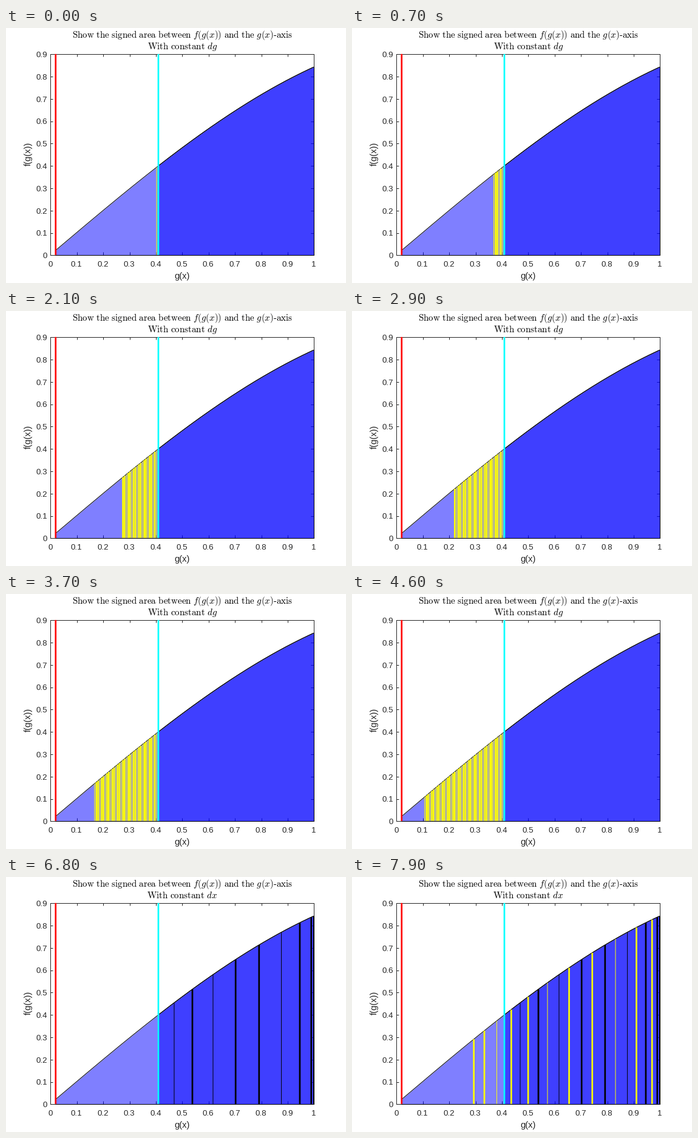
These frames come from a looping animation (560 px wide and 420 px high, 8000 ms). A matplotlib script:

```python
import numpy as np
import matplotlib.pyplot as plt
from matplotlib.animation import FuncAnimation
from matplotlib.collections import LineCollection

DPI = 80
PX = 72 / DPI                       # one pixel in points
LEFT, WIDTH, BOTTOM, HEIGHT = 72.8, 434, 373.8, 331
INK = "#262626"
THICK, THIN = 2.67 * PX, 1.0 * PX

X_START, DX = -1.2, 0.1375
G_LAST = 0.02

plt.rcParams["font.family"] = "Liberation Sans"
plt.rcParams["mathtext.fontset"] = "cm"


def g(x):
    return 1 / (1 + x ** 2)


G_FIRST = g(X_START)
DG = (G_FIRST - G_LAST) / 58


def sx(v):
    return LEFT + WIDTH * v


def sy(v):
    return BOTTOM - HEIGHT * v / 0.9


def pixel(p):
    """Centre of the pixel that holds p."""
    return np.floor(p) + 0.5


fig = plt.figure(figsize=(560 / DPI, 420 / DPI), dpi=DPI, facecolor="white")
ax = fig.add_axes([0, 0, 1, 1])
ax.set_xlim(0, 560)
ax.set_ylim(420, 0)
ax.axis("off")


def line(xs, ys, color, width=THIN, z=1, snap=None):
    ax.plot(xs, ys, color=color, lw=width, zorder=z, snap=snap,
            solid_capstyle="butt")


def label(x, y, text, size, **kw):
    kw.setdefault("ha", "center")
    kw.setdefault("va", "baseline")
    return ax.text(x, y, text, fontsize=size * PX, color=kw.pop("color", INK), **kw)


def upright(words):
    return r"\ ".join(r"\text{%s}" % w for w in words.split())


# frame, ticks and tick labels
x0, x1 = pixel(sx(0)), pixel(sx(1))
y0, y1 = pixel(sy(0.9)), pixel(sy(0))
line([x0, x1, x1, x0, x0], [y0, y0, y1, y1, y0], INK, snap=True)
TICK = 4.5
for i in range(11):
    v = i / 10
    tx = pixel(sx(v))
    line([tx, tx], [y0, y0 + TICK], INK, snap=True)
    line([tx, tx], [y1 - TICK, y1], INK, snap=True)
    label(sx(v), 393, f"{v:g}", 13.33)
    if i < 10:
        ty = pixel(sy(v))
        line([x0, x0 + TICK], [ty, ty], INK, snap=True)
        line([x1 - TICK, x1], [ty, ty], INK, snap=True)
        label(68, sy(v) + 5.3, f"{v:g}", 13.33, ha="right")
label(290, 413, "g(x)", 14.67)
label(36.5, 207.5, "f(g(x))", 14.67, rotation=90, va="center")

# title
head = (upright("Show the signed area between") + r"\ f(g(x))\ "
        + upright("and the") + r"\ g(x)" + upright("-axis"))
label(290.3, 15.5, f"${head}$", 15, color="black")
subtitle = label(290.3, 35, "", 15, color="black")

# two overlapping translucent areas, each with its own outline
for start in (G_LAST, G_FIRST):
    gs = np.linspace(start, 1, 200)
    xs, ys = sx(gs), sy(np.sin(gs))
    ax.fill_between(xs, sy(0), ys, color="blue", alpha=0.5, lw=0, zorder=2)
    line(xs, ys, "black", z=3, snap=False)
    line([sx(start), x1, x1], [y1, y1, ys[-1]], "black", z=3, snap=True)

marks = LineCollection([], zorder=4, snap=False, capstyle="butt")
ax.add_collection(marks)


def upright_line(v, top):
    x = sx(v) + 0.3
    return [(x, sy(0)), (x, sy(top))]


for v, color in ((G_LAST, "red"), (G_FIRST, "cyan")):
    line(*zip(*upright_line(v, 0.9)), color, THICK, z=6, snap=False)


def draw(i):
    if i < 60:
        count = max(i - 1, 1 + i // 2 if i < 4 else 0)
        k = np.arange(1, min(count, 57) + 1)
        pos = G_FIRST - DG * k
        colors = ["yellow"] * len(k)
        name = "dg"
    else:
        k = np.arange(1, i - 58)
        pos = g(X_START + DX * k)
        colors = ["black" if n <= 9 else "yellow" for n in k]
        name = "dx"
    marks.set_segments([upright_line(p, np.sin(p)) for p in pos])
    marks.set_linewidths([THIN if n == 1 or n % 3 == 0 else THICK for n in k])
    marks.set_colors(colors)
    subtitle.set_text(f"${upright('With constant')}\\ {name}$")
    return marks, subtitle


anim = FuncAnimation(fig, draw, frames=80, interval=100, repeat=True,
                     repeat_delay=0, blit=False)
plt.show()
```
